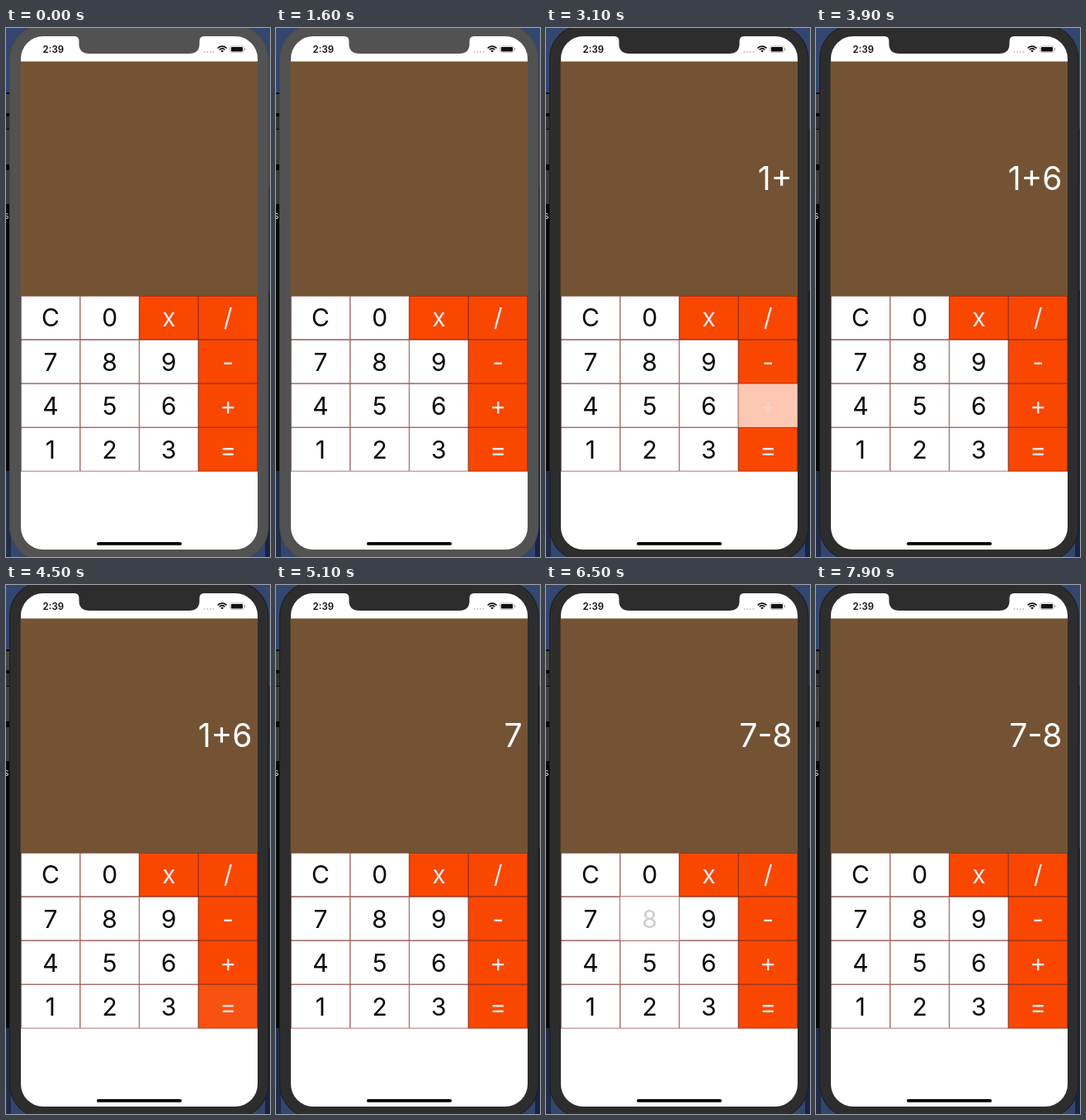
An HTML page with a canvas for the animation above (8000 ms loop, 320x640 px).

```html
<!DOCTYPE html>
<html lang="en">
<head>
<meta charset="utf-8">
<title>Calculator</title>
<style>
  html, body { margin: 0; width: 100%; height: 100%; overflow: hidden; background: #000; }
  canvas { display: block; width: 320px; height: 640px; }
</style>
</head>
<body>
<canvas id="stage"></canvas>
<script>
const W = 320, H = 640, LOOP = 8000, STEP = 100;
const FOCUS_AT = 1900;
const FONT = 'Inter, Roboto, sans-serif';
const canvas = document.getElementById('stage');
const ctx = canvas.getContext('2d');
const dpr = window.devicePixelRatio || 1;
canvas.width = W * dpr;
canvas.height = H * dpr;

const KEYS = ['C0x/', '789-', '456+', '123='];
const GRID = { x: 18, y: 324, w: 71.75, h: 53.1 };

// Each tap: key, release time, and the display after it
const TAPS = [
  { key: '1', up: 2300, shows: '1' },
  { key: '+', up: 3038, shows: '1+' },
  { key: '6', up: 3600, shows: '1+6' },
  { key: '=', up: 4600, shows: '7' },
  { key: '-', up: 5585, shows: '7-' },
  { key: '8', up: 6500, shows: '7-8' }
];
const HOLD = 130, FADE_IN = 150, FADE_OUT = 250, DIM = 0.2;

const clamp = v => Math.max(0, Math.min(1, v));
const ease = v => v < 0.5 ? 2 * v * v : 1 - 2 * (1 - v) * (1 - v);

function keyAlpha(key, t) {
  const tap = TAPS.find(p => p.key === key);
  if (!tap) return 1;
  const pressed = 1 - (1 - DIM) * ease(clamp((t - tap.up + HOLD) / FADE_IN));
  if (t < tap.up) return pressed;
  return DIM + (1 - DIM) * ease(clamp((t - tap.up) / FADE_OUT));
}

function rect(color, x, y, w, h) {
  ctx.fillStyle = color;
  ctx.fillRect(x, y, w, h);
}

function round(color, x, y, w, h, r) {
  ctx.fillStyle = color;
  ctx.beginPath();
  ctx.roundRect(x, y, w, h, r);
  ctx.fill();
}

function text(str, x, y, size, color, align = 'center', weight = 400) {
  ctx.font = `${weight} ${size}px ${FONT}`;
  ctx.textAlign = align;
  ctx.fillStyle = color;
  ctx.fillText(str, x, y);
}

function drawDesktop(focused) {
  rect('#32466f', 0, 0, W, H);
  rect('#080808', 0, 78, 6, 458);
  rect('#444444', 0, 80, 6, 23);
  rect('#333333', 0, 107, 6, 15);
  rect('#414141', 0, 123, 6, 42);
  rect('#3c3c3c', 0, 172, 6, 41);
  text('s', 0.5, 231, 12, '#c8c8c8', 'center');
  rect('#202c48', 0, 536, 6, 104);
  rect(focused ? '#30303a' : '#4a4346', 314, 122, 6, 70);
  rect('#2a3758', 314, 192, 6, 126);
  rect('#182444', 314, 318, 6, 322);
}

function drawNotch(color) {
  ctx.fillStyle = color;
  ctx.beginPath();
  ctx.moveTo(83, 9);
  ctx.lineTo(83, 10);
  ctx.quadraticCurveTo(88.5, 10, 88.5, 16);
  ctx.lineTo(88.5, 19);
  ctx.quadraticCurveTo(88.5, 31, 101, 31);
  ctx.lineTo(222, 31);
  ctx.quadraticCurveTo(234.5, 31, 234.5, 19);
  ctx.lineTo(234.5, 16);
  ctx.quadraticCurveTo(234.5, 10, 240, 10);
  ctx.lineTo(240, 9);
  ctx.fill();
}

function drawStatus() {
  text('2:39', 57.3, 29.6, 11.5, '#111', 'center', 600);
  for (let i = 0; i < 4; i++) round('#c4c4c4', 239.5 + i * 3.6, 28, 2, 2, 1);

  ctx.strokeStyle = '#111';
  ctx.lineWidth = 1.6;
  for (const r of [7.2, 4.4]) {
    ctx.beginPath();
    ctx.arc(262, 29.3, r, -Math.PI * 0.77, -Math.PI * 0.23);
    ctx.stroke();
  }
  ctx.fillStyle = '#111';
  ctx.beginPath();
  ctx.moveTo(262, 29.5);
  ctx.arc(262, 29.3, 2.4, -Math.PI * 0.77, -Math.PI * 0.23);
  ctx.fill();

  ctx.strokeStyle = '#aaa';
  ctx.lineWidth = 0.7;
  ctx.beginPath();
  ctx.roundRect(271.5, 21.8, 16.8, 7.8, 2.2);
  ctx.stroke();
  round('#111', 272.8, 23, 14.2, 5.4, 1.2);
  round('#999', 289.2, 24.3, 1, 2.8, 0.5);
}

function drawKey(key, col, row, t) {
  const { w, h } = GRID;
  const x = GRID.x + col * w, y = GRID.y + row * h;
  const orange = 'x/-+='.includes(key);
  ctx.globalAlpha = keyAlpha(key, t);
  rect(orange ? '#f94700' : '#fff', x, y, w, h);
  ctx.strokeStyle = '#74201c';
  ctx.lineWidth = 0.6;
  ctx.strokeRect(x + 0.3, y + 0.3, w - 0.6, h - 0.6);
  text(key, x + w / 2, y + h / 2 + 10.9, 30, orange ? '#e3ebf1' : '#0a0a0a');
  ctx.globalAlpha = 1;
}

function draw(t) {
  const focused = t >= FOCUS_AT;
  const bezel = focused ? '#2d2d2d' : '#525252';
  ctx.setTransform(dpr, 0, 0, dpr, 0, 0);
  drawDesktop(focused);

  round(focused ? '#1d1d1f' : '#48484a', 4, -4, 314.5, 649, 41);
  round(bezel, 5, -3, 312.5, 647, 40);
  round('#fff', 18, 10, 287, 621, 27);
  drawNotch(bezel);
  drawStatus();

  rect('#735334', 17.5, 40.5, 287.5, 283.5);
  const last = TAPS.filter(p => p.up <= t).pop();
  if (last) text(last.shows, 298.5, 196, 39, '#fff', 'right');

  KEYS.forEach((line, row) => [...line].forEach((key, col) => drawKey(key, col, row, t)));
  round('#050505', 110, 622, 103, 3.8, 1.9);
}

const start = performance.now();
function frame() {
  const t = (performance.now() - start) % LOOP;
  draw(Math.floor(t / STEP) * STEP);
  requestAnimationFrame(frame);
}
frame();
</script>
</body>
</html>
```
